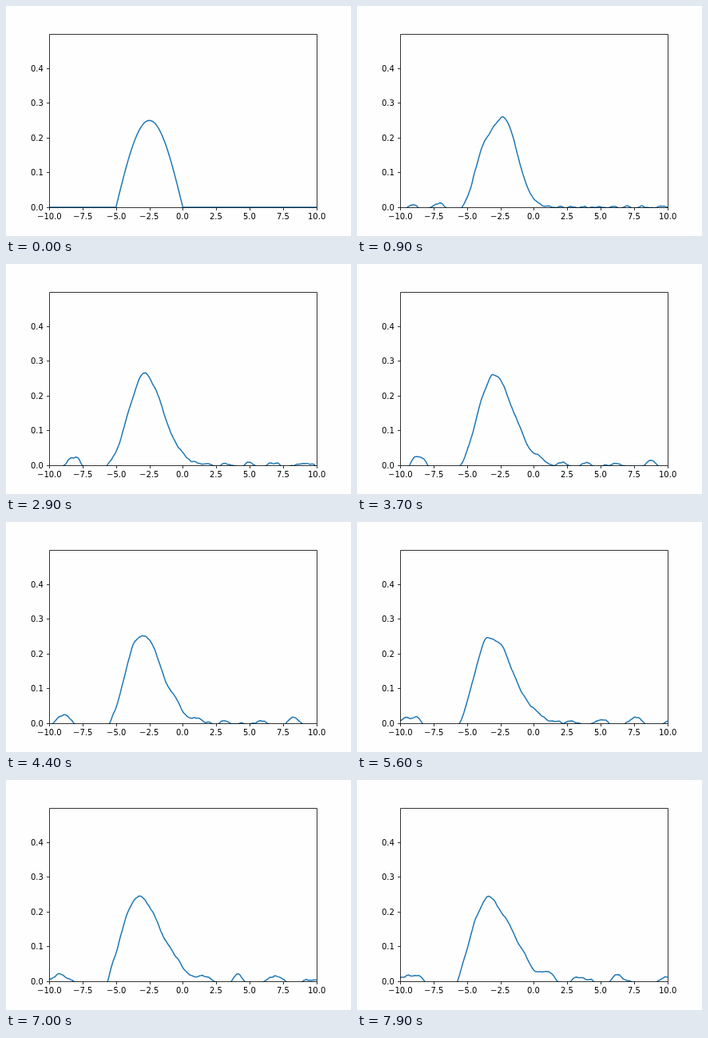
An HTML page for the animation above (8000 ms loop, 432x288 px).

```html
<!DOCTYPE html>
<html lang="en">
<head>
<meta charset="utf-8">
<title>Wave evolution</title>
<style>
  html, body { margin: 0; width: 100%; height: 100%; overflow: hidden; background: #fefefe; }
  svg { display: block; width: 432px; height: 288px; }
  text { font: 10px "DejaVu Sans", sans-serif; fill: #000; }
  #axes path { fill: none; stroke: #000; stroke-width: 0.8; }
  #curve { fill: none; stroke: #1f77b4; stroke-width: 1.5; stroke-linejoin: round; }
</style>
</head>
<body>
<svg viewBox="0 0 432 288">
  <clipPath id="plot"><rect x="54" y="35" width="335" height="218"/></clipPath>
  <g clip-path="url(#plot)"><path id="curve"/></g>
  <g id="axes"><path/></g>
</svg>
<script>
const LEFT = 54, BOTTOM = 252, WIDTH = 334.8, HEIGHT = 217.44;
const LOOP = 8000, STEP = 100, FRAMES = LOOP / STEP;
const px = x => LEFT + (x + 10) / 20 * WIDTH;
const py = y => BOTTOM - y / 0.5 * HEIGHT;
const snap = v => Math.floor(v + 0.5) + 0.5;

// Korteweg-de Vries equation u_t + u u_x + u_xxx = 0, periodic on [-10, 10]
const N = 256, MODES = N / 2, SUBSTEPS = 3, DT = 0.01 / SUBSTEPS;
const cos = Float64Array.from({ length: N }, (_, i) => Math.cos(2 * Math.PI * i / N));
const sin = Float64Array.from({ length: N }, (_, i) => Math.sin(2 * Math.PI * i / N));
const gridX = j => -10 + 20 * j / N;
const waveNumber = n => n * Math.PI / 10;

function spectrum(u) {
  const re = new Float64Array(MODES), im = new Float64Array(MODES);
  for (let n = 0; n < MODES; n++) {
    for (let j = 0; j < N; j++) {
      const p = n * j % N;
      re[n] += u[j] * cos[p] / N;
      im[n] -= u[j] * sin[p] / N;
    }
  }
  return { re, im };
}

function synthesize({ re, im }) {
  const u = new Float64Array(N);
  for (let j = 0; j < N; j++) {
    let sum = 0;
    for (let n = 1; n < MODES; n++) {
      const p = n * j % N;
      sum += re[n] * cos[p] - im[n] * sin[p];
    }
    u[j] = re[0] + 2 * sum;
  }
  return u;
}

// Steepening by u u_x, then exact dispersion of every mode
function advance(u, wave) {
  const square = spectrum(u.map(v => v * v));
  for (let n = 0; n < MODES; n++) {
    const k = waveNumber(n);
    const re = wave.re[n] + DT * k / 2 * square.im[n];
    const im = wave.im[n] - DT * k / 2 * square.re[n];
    const c = Math.cos(k ** 3 * DT), s = Math.sin(k ** 3 * DT);
    wave.re[n] = re * c - im * s;
    wave.im[n] = re * s + im * c;
  }
  return synthesize(wave);
}

function toPath(u) {
  let d = "";
  for (let j = 0; j <= N; j++) {
    d += (j ? "L" : "M") + px(gridX(j)).toFixed(2) + " " + py(u[j % N]).toFixed(2);
  }
  return d;
}

function simulate() {
  let u = Float64Array.from({ length: N }, (_, j) => {
    const x = gridX(j);
    return x > -5 && x < 0 ? -0.25 * Math.sin(Math.PI * x / 5) : 0;
  });
  const wave = spectrum(u), paths = [toPath(u)];
  while (paths.length < FRAMES) {
    for (let i = 0; i < SUBSTEPS; i++) u = advance(u, wave);
    paths.push(toPath(u));
  }
  return paths;
}

const axes = document.getElementById("axes");

// align: 0.5 centres the label on x, 1 ends it there
function label(value, x, y, align) {
  const text = document.createElementNS("http://www.w3.org/2000/svg", "text");
  text.textContent = value.toFixed(1).replace("-", "\u2212");
  axes.append(text);
  text.setAttribute("x", Math.round(x - text.getComputedTextLength() * align));
  text.setAttribute("y", Math.round(y));
}

function drawAxes() {
  const right = snap(LEFT + WIDTH), top = snap(BOTTOM - HEIGHT);
  const x0 = snap(LEFT), y0 = snap(BOTTOM);
  let lines = `M${x0} ${top}H${right}V${y0}H${x0}Z`;
  for (let v = -10; v <= 10; v += 2.5) {
    lines += `M${snap(px(v))} ${y0}v3.5`;
    label(v, px(v), 267, 0.5);
  }
  for (let i = 0; i <= 4; i++) {
    const y = py(i / 10);
    lines += `M${x0} ${Math.floor(y) + 0.5}h-3.5`;
    label(i / 10, 47, y + 3.8, 1);
  }
  axes.querySelector("path").setAttribute("d", lines);
}

drawAxes();
const paths = simulate();
const curve = document.getElementById("curve");
const start = performance.now();

function tick() {
  const frame = Math.floor((performance.now() - start) % LOOP / STEP);
  curve.setAttribute("d", paths[frame]);
  requestAnimationFrame(tick);
}
tick();
</script>
</body>
</html>
```
